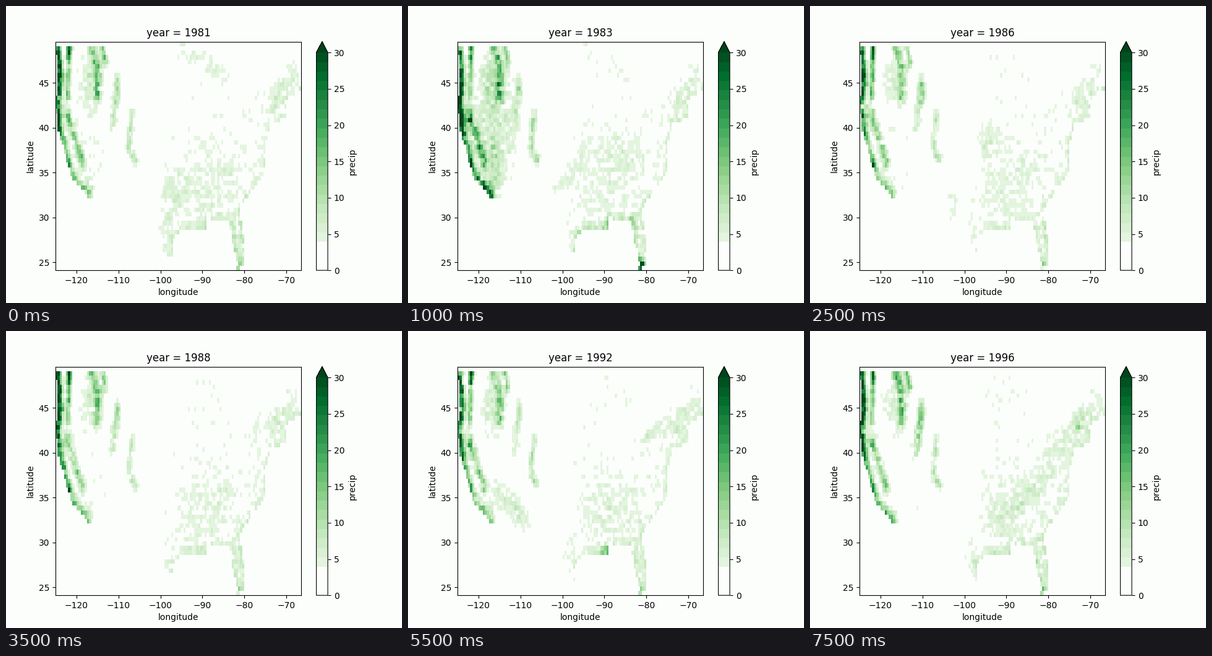
Write a matplotlib script that moves like this. It is 640x480 px and loops after 8000 ms.

```python
import numpy as np
import matplotlib.pyplot as plt
from matplotlib.animation import FuncAnimation
from matplotlib.colors import BoundaryNorm, ListedColormap
from matplotlib.path import Path

plt.rcParams["text.kerning_factor"] = 6

PAPER = "#fcfefc"
FIRST, YEARS = 1981, 16
lon_edges = np.arange(-125, -66, 0.5)
lat_edges = 24.11 + 0.5 * np.arange(52)
LON, LAT = np.meshgrid(lon_edges[:-1] + 0.25, lat_edges[:-1] + 0.25)

# Key points of the outline, counter-clockwise from the north-west.
PACIFIC = [(-124.8, 48.6), (-124.3, 45), (-124.9, 42.9), (-124.6, 40.1),
           (-122.2, 36.2), (-121, 34.4), (-118.4, 33), (-117.3, 32.3)]
MEXICO = [(-111, 31.2), (-106.5, 31.4), (-103, 28.8), (-101, 29.3), (-99.2, 26)]
GULF = [(-97.1, 25.6), (-97.2, 27.4), (-95, 28.8), (-90.4, 28.7), (-89, 28.8),
        (-89, 29.9), (-83.5, 29.7), (-82.9, 27.5), (-81.6, 25)]
ATLANTIC = [(-82.5, 24.1), (-81.5, 24.1), (-80, 24.8), (-80, 27.4), (-81.2, 31),
            (-75.3, 35), (-74.8, 38.4), (-73.8, 40.4), (-69.8, 41.2),
            (-70.5, 43.1), (-66.5, 44.4)]
NORTH = [(-67.8, 47.4), (-69.4, 47.6), (-70.5, 45.5), (-75, 45.1), (-79, 42.8),
         (-82.6, 41.5), (-83.4, 46), (-88, 48.3), (-93, 48.7), (-94.6, 49.6),
         (-95.4, 49.6), (-95.4, 49.1), (-125, 49.1)]

outline = Path(PACIFIC + MEXICO + GULF + ATLANTIC + NORTH)
cells = np.column_stack([LON.ravel(), LAT.ravel()])
land = outline.contains_points(cells).reshape(LON.shape)


def band(width, path):
    """Soft ridge around a polyline."""
    near = np.full(LON.shape, np.inf)
    for (x0, y0), (x1, y1) in zip(path, path[1:]):
        dx, dy = x1 - x0, y1 - y0
        t = np.clip(((LON - x0) * dx + (LAT - y0) * dy) / (dx * dx + dy * dy), 0, 1)
        near = np.minimum(near, np.hypot(LON - x0 - t * dx, LAT - y0 - t * dy))
    return np.exp(-(near / width) ** 2)


def blob(lon, lat, rx, ry):
    return np.exp(-np.hypot((LON - lon) / rx, (LAT - lat) / ry) ** 3)


def step(values, edge, width):
    return 1 / (1 + np.exp((edge - values) / width))


# Rain belts: (shape, usual strength, extra in the wettest year, that year).
coast = band(0.75, [(x + 0.35, y) for x, y in PACIFIC]) * (11 + 16 * step(LAT, 39, 0.8))
cascades = band(0.6, [(-121.7, 49), (-122.1, 43.5)]) * (11 + 15 * step(LAT, 47.3, 0.4))
divide = band(0.6, [(-113.8, 49), (-113.2, 47.5)])
BELTS = [
    (coast * step(LAT, 43, 0.5), 0.95, 0.2, 1996),
    (coast * step(-LAT, -43, 0.5), 0.9, 0.5, 1983),
    (blob(-121.8, 36, 0.6, 0.5), 12, 4, 1986),
    (blob(-122.8, 41.3, 1.5, 1.1), 6, 5, 1983),
    (cascades, 0.95, 0.4, 1990),
    (band(0.75, [(-122, 41), (-118.6, 36.2)]), 9, 8, 1984),
    (band(0.9, [(-119.5, 34.3), (-116.8, 33)]), 2.5, 5, 1983),
    (band(0.8, [(-116.4, 49), (-114.8, 46.5), (-115, 43.8)]), 10, 5, 1996),
    (divide, 12, 6, 1990),
    (blob(-116.3, 45.4, 3, 3), 3.3, 2, 1983),
    (band(0.8, [(-110.2, 45.2), (-111.4, 40.5)]), 5, 5, 1996),
    (blob(-110.2, 44, 1, 1.3), 3, 5, 1986),
    (band(0.7, [(-106.7, 41.3), (-107.5, 37.8), (-106, 36.5)]), 6, 2.5, 1982),
    (blob(-117, 40, 6, 6), 0.5, 3.7, 1983),
    (blob(-115.8, 35.5, 1.5, 3), 0, 4, 1983),
    (band(1.4, [(-116, 35.3), (-112, 34.3), (-108.8, 32.3)]), 0.6, 3.4, 1992),
    (band(0.6, GULF), 2.6, 3, 1983),
    (blob(-90, 29, 1.6, 0.7), 2, 7, 1992),
    (band(0.6, ATLANTIC), 2.2, 1.2, 1994),
    (blob(-81.5, 27.4, 1.8, 3.6), 2.8, 0.8, 1981),
    (blob(-81.5, 24.5, 1.6, 0.7), 2, 16, 1983),
    (blob(-98.3, 28, 2.2, 2.6), 1.3, 1.6, 1981),
    (blob(-97, 33, 3, 3), 0.3, 2, 1981),
    (blob(-103, 31.3, 2, 1.8), 0.2, 2, 1986),
    (band(1, [(-102, 32.8), (-95.5, 36.5)]), 0, 2.6, 1983),
    (blob(-94, 38.5, 3, 2), 0.3, 2.2, 1986),
    (blob(-88.5, 33, 9, 4.2), 1.4, 0.6, 1990),
    (blob(-88, 37.5, 7, 2.2), 0.2, 1.5, 1983),
    (band(1.6, [(-91, 32.7), (-83, 36), (-72, 44)]), 0.3, 1.9, 1996),
    (band(1.4, [(-77, 35.5), (-73, 42)]), 0.8, 1.2, 1996),
    (band(1.4, [(-72.5, 43), (-68, 46)]), 2.2, 0.8, 1981),
    (band(1, [(-80, 42), (-75, 43.5)]), 0.3, 2, 1992),
    (band(1.2, [(-95, 49), (-84.5, 46)]), 0.4, 1.2, 1981),
]

# Dry plains between a moister west and east.
BASE = 1.9 + 0.8 * step(LON, -97, 1.5) - 0.5 * step(LON, -109, 1) * step(-LON, 100, 1)


def grain(rng):
    """Unit noise in short horizontal streaks."""
    n = rng.normal(size=LON.shape)
    return (n + 0.6 * np.roll(n, 1, axis=1)) / np.hypot(1, 0.6)


fixed = grain(np.random.default_rng(7))


def rainfall(year):
    rng = np.random.default_rng(year)
    rain = BASE.copy()
    for shape, usual, extra, peak in BELTS:
        wet = usual + extra * np.exp(-((year - peak) / 1.3) ** 2)
        rain += shape * wet * (1 + 0.08 * rng.normal())
    rain *= 1 + 0.26 * (0.6 * fixed + 0.8 * grain(rng))
    return np.ma.masked_where(~land, np.maximum(rain, 0))


levels = np.linspace(0, 30, 24)
greens = plt.get_cmap("Greens")(np.linspace(0, 1, 24))
shades = [PAPER] * 3 + list(greens[3:])
cmap = ListedColormap(shades[:-1]).with_extremes(over=shades[-1])

fig, ax = plt.subplots(figsize=(6.4, 4.8), dpi=100, facecolor=PAPER)
ax.set_facecolor(PAPER)
mesh = ax.pcolormesh(lon_edges, lat_edges, rainfall(FIRST), cmap=cmap,
                     norm=BoundaryNorm(levels, cmap.N))
ax.set(xlabel="longitude", ylabel="latitude")
bar = fig.colorbar(mesh, ax=ax, extend="max", ticks=range(0, 31, 5))
bar.set_label("precip")
bar.ax.minorticks_off()
title = ax.set_title("")


def update(i):
    year = FIRST + i
    mesh.set_array(rainfall(year))
    title.set_text(f"year = {year}")
    return mesh, title


anim = FuncAnimation(fig, update, frames=YEARS, interval=500, repeat=True, repeat_delay=0)
plt.show()
```
